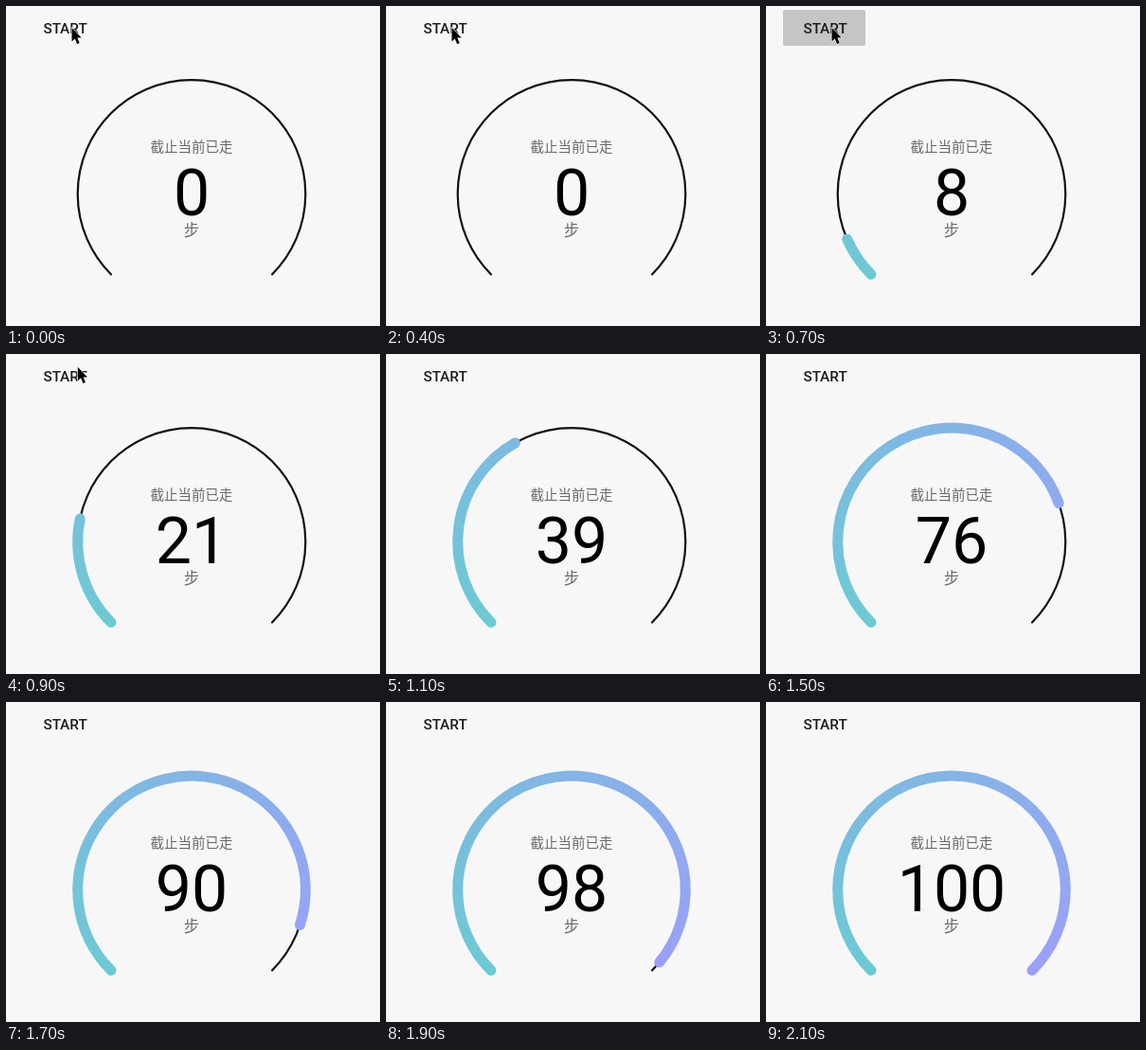
Write an HTML page that moves like this. It is 395 px wide and 338 px high and loops after 3000 ms.

```html
<!DOCTYPE html>
<html lang="zh">
<head>
<meta charset="utf-8">
<title>Step counter</title>
<style>
  html, body { margin: 0; width: 100%; height: 100%; overflow: hidden; background: #f7f7f7; }
  svg { display: block; width: 395px; height: 338px; }
  text { text-anchor: middle; font-family: Roboto, sans-serif; }
  .start { font-size: 15.3px; font-weight: 500; fill: #1c1c1c; }
  .count { font-size: 68px; fill: #000; }
  .note { font-family: "Noto Sans CJK SC", "Noto Sans CJK", sans-serif; fill: #6a6a6a; }
</style>
</head>
<body>
<svg viewBox="0 0 395 338">
  <defs>
    <mask id="reveal" maskUnits="userSpaceOnUse" x="0" y="0" width="395" height="338">
      <path id="sweep" fill="none" stroke="#fff" stroke-width="11" stroke-linecap="round"/>
    </mask>
  </defs>
  <rect id="press" x="18" y="4" width="87" height="38" rx="2"/>
  <text class="start" x="62.6" y="29">START</text>
  <path id="track" fill="none" stroke="#111" stroke-width="2.2" stroke-linecap="round"/>
  <g mask="url(#reveal)"><g id="ring" fill="none" stroke-width="16"></g></g>
  <text class="note" x="196" y="154.3" font-size="14.5">截止当前已走</text>
  <text id="count" class="count" x="196" y="221">0</text>
  <text class="note" x="196" y="243" font-size="16.5">步</text>
  <path id="cursor" d="M0 0V14.5L3.3 11.5L5.6 17.2L8.2 16.1L5.8 10.6H10.2Z"
        fill="#000" stroke="#fff" stroke-width="1.2" stroke-linejoin="round" paint-order="stroke"/>
</svg>
<script>
const LOOP = 3000, STEP = 100, BEGIN = 405, DURATION = 1610;
const CX = 196, CY = 198.4, R = 120.3;
const FROM = [108, 202, 211], TO = [156, 159, 249];
const $ = id => document.getElementById(id);

// Point on the dial; 0 to 100 spans 270 degrees from the lower left.
function point(value) {
  const a = (135 + value * 2.7) * Math.PI / 180;
  return (CX + R * Math.cos(a)).toFixed(2) + ' ' + (CY + R * Math.sin(a)).toFixed(2);
}

function arc(a, b) {
  const large = (b - a) * 2.7 > 180 ? 1 : 0;
  return `M${point(a)}A${R} ${R} 0 ${large} 1 ${point(b)}`;
}

function color(value) {
  const k = Math.min(1, Math.max(0, value / 100));
  return `rgb(${FROM.map((c, i) => Math.round(c + (TO[i] - c) * k))})`;
}

function buildRing() {
  for (let i = -4; i < 104; i++) {
    const part = document.createElementNS('http://www.w3.org/2000/svg', 'path');
    part.setAttribute('d', arc(i, i + 1.3));
    part.setAttribute('stroke', color(i + 0.5));
    $('ring').append(part);
  }
}

function pressShade(t) {
  if (t < 500 || t >= 900) return 'none';
  return t === 600 || t === 700 ? '#c5c5c5' : '#dfdfdf';
}

function draw(time) {
  const t = Math.floor(time / STEP) * STEP;
  const p = Math.min(1, Math.max(0, (t - BEGIN) / DURATION));
  const value = Math.floor((1 - Math.cos(Math.PI * p)) * 50 + 1e-6);

  $('count').textContent = value;
  $('sweep').setAttribute('d', value ? arc(0, value) : '');
  $('press').setAttribute('fill', pressShade(t));
  $('cursor').setAttribute('visibility', t < 1000 ? 'visible' : 'hidden');
  $('cursor').setAttribute('transform', t < 900 ? 'translate(69.5 23)' : 'translate(75.8 13.8)');
}

buildRing();
$('track').setAttribute('d', arc(0, 100));
draw(0);
const origin = performance.now();
(function tick() {
  draw((performance.now() - origin) % LOOP);
  requestAnimationFrame(tick);
})();
</script>
</body>
</html>
```
